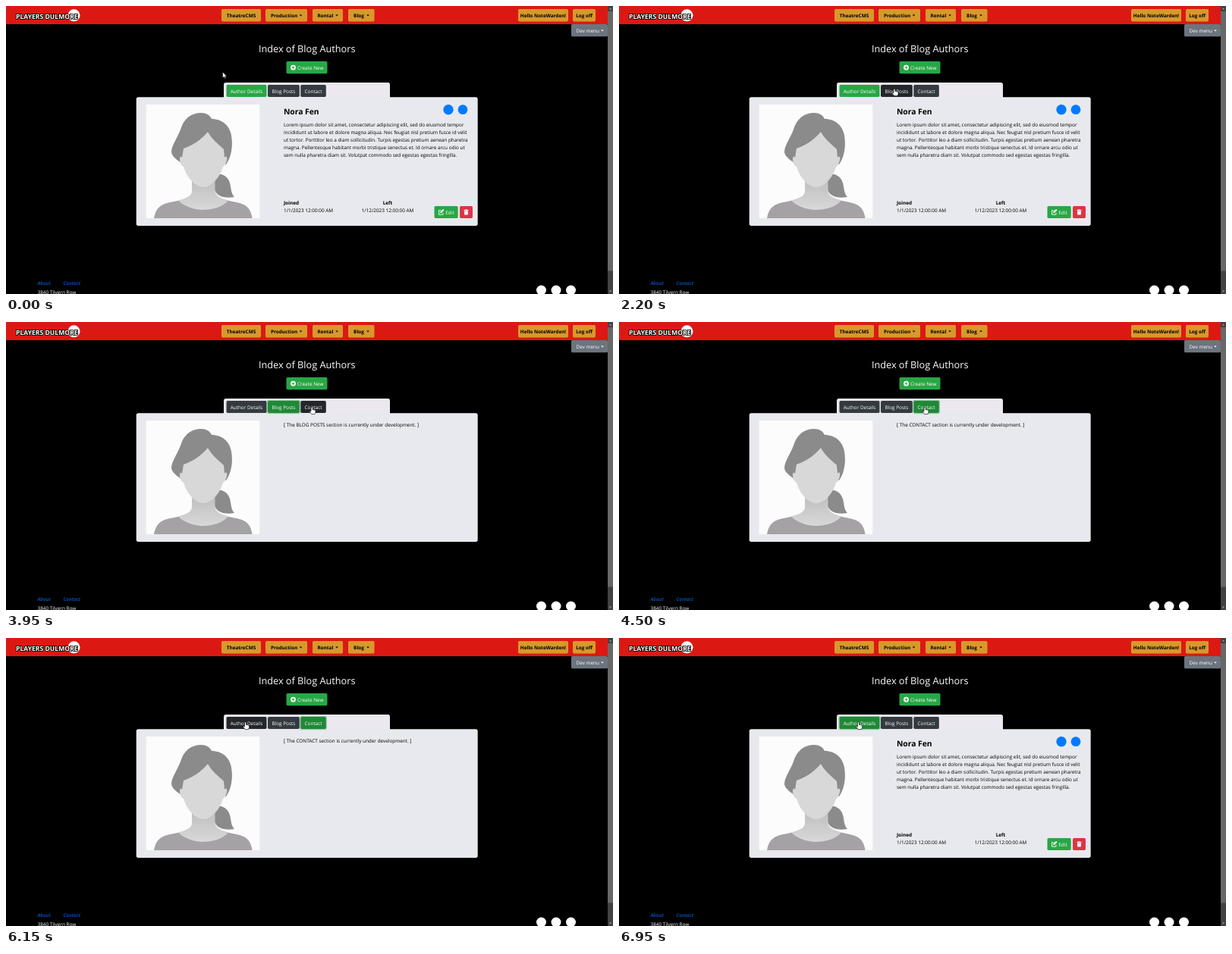
An HTML page that plays this animation: 800x380 px, repeating every 7 s.

```html
<!DOCTYPE html>
<html lang="en">
<head>
<meta charset="utf-8">
<title>Blog authors</title>
<style>
  html, body { margin: 0; width: 100%; height: 100%; overflow: hidden; background: #000; }
  svg { display: block; width: 800px; height: 380px; }
  text { font: 6.4px "Open Sans", "Noto Sans", sans-serif; text-rendering: geometricPrecision; white-space: pre; }
  .b { font-weight: 700; }
  .mid { text-anchor: middle; }
  .link { font-weight: 600; font-style: italic; fill: #0a58d0; }
</style>
</head>
<body>
<svg id="stage" viewBox="0 0 800 380">
  <defs>
    <linearGradient id="neck" x1="0" y1="0" x2="0" y2="1">
      <stop offset="0" stop-color="#bdbcbd"/>
      <stop offset="1" stop-color="#d9d8d9"/>
    </linearGradient>
    <clipPath id="photo"><rect x="184.5" y="130" width="150" height="150"/></clipPath>
  </defs>
  <g id="page"></g>

  <g clip-path="url(#photo)">
    <rect x="184.5" y="130" width="150" height="150" fill="#fdfcfd"/>
    <path fill="#8c8b8c" d="M233 209C229 205 219 200 218 193C218 184 226 174 230 163C234 149 244 141 257 141C264 141 269 144 271 149C285 149 295 158 297 171C299 182 298 198 290 209Z"/>
    <path fill="#8c8b8c" d="M277 222C289 220 295 229 296 238C297 245 298 249 301 252C290 254 280 252 276 245C272 237 272 228 277 222Z"/>
    <path fill="#a4a2a4" d="M195 280C197 269 202 262 214 259.500C227 257 240 255 245 249H275C280 255 294 257 306 259.500C318 262 323 269 324.500 280Z"/>
    <path fill="url(#neck)" d="M245 224H275.500V244C276 251 284 254 293 256.500C286 265 272 269 260 269C247 269 234 264 227 256.500C237 254 245 251 245 244Z"/>
    <path fill="#d9d8d9" d="M266 166C270 174 279 182 287 189L288 200C290 197 292 199 291 203C290 208 288 211 286 212C282 226 271 239 260 239C249 239 238 226 234 212C231 211 229 206 229 202C229 198 231 198 232 200L234 188C246 184 258 176 266 166Z"/>
  </g>

  <g id="details"></g>
  <text id="notice" x="366" y="137.600"></text>
  <g id="tabs"></g>
  <g id="cursor" stroke="#000" stroke-width=".6" stroke-linejoin="round" fill="#fff">
    <path id="arrow" d="M0 0V8L1.900 6.300L3.200 9L4.400 8.400L3.200 5.900H5.600Z"/>
    <path id="hand" d="M-1 .9Q0 -.7 1 .9V3.600Q1.900 3 2.500 3.900Q3.400 3.400 3.900 4.300Q5 4.100 5 5.200V7.200L4 9.600H-.4L-2.800 6.500Q-3.200 5 -1.900 5.300L-1 6.200Z"/>
  </g>
</svg>
<script>
const $ = id => document.getElementById(id);
const page = $("page"), details = $("details");

function add(parent, tag, attrs, content) {
  const el = document.createElementNS("http://www.w3.org/2000/svg", tag);
  for (const key in attrs) el.setAttribute(key, attrs[key]);
  if (content) el.textContent = content;
  parent.appendChild(el);
  return el;
}
const box = (p, x, y, width, height, fill, rx = 0) => add(p, "rect", { x, y, width, height, fill, rx });
const label = (p, x, y, str, fill = "#000", cls = "", more = {}) =>
  add(p, "text", { x, y, fill, class: cls, ...more }, str);
const dot = (p, cx, cy, r, fill) => add(p, "circle", { cx, cy, r, fill });
const shape = (p, d, fill) => add(p, "path", { d, fill });
const caret = (x, y, fill) => shape(page, `M${x - 1.8} ${y}h3.600l-1.800 1.900z`, fill);

// Navigation bar
box(page, 0, 0, 793, 24, "#dc1813");
dot(page, 89.5, 12.3, 8, "#fff");
label(page, 13, 16.8, "PLAYERS DULMORE", "#fff", "b",
  { style: "font-size:8.600px", stroke: "#000", "stroke-width": 1.6, "paint-order": "stroke" });
[
  [284, 52, "TheatreCMS", 310], [342, 55, "Production", 366.5, 388.5],
  [404, 40, "Rental", 421, 436], [451, 34.5, "Blog", 465, 477],
  [675, 66, "Hello NoteWarden!", 708], [747, 30, "Log off", 762]
].forEach(([x, w, str, mid, tip]) => {
  box(page, x, 4, w, 16.5, "#d9982b", 1.7);
  label(page, mid, 14.8, str, "#000", "b mid");
  if (tip) caret(tip, 11.6, "#000");
});
box(page, 745, 24, 48, 16.3, "#6c757d", 1.5);
label(page, 766.7, 34.8, "Dev menu", "#fff", "mid");
caret(786, 31.5, "#fff");

// Scrollbar
box(page, 793, 0, 7, 380, "#424242");
box(page, 793, 7, 7, 342.5, "#686868");
shape(page, "M794.800 4.500l1.700 -2l1.700 2z", "#a0a0a0");
shape(page, "M794.800 375.500l1.700 2l1.700 -2z", "#a0a0a0");

// Heading and card
label(page, 396.7, 61, "Index of Blog Authors", "#fff", "mid", { style: "font-size:12.700px" });
box(page, 369.5, 73, 54, 16.3, "#28a745", 1.7);
dot(page, 378.5, 81.2, 3.4, "#fff");
shape(page, "M378 79.200h1v1.500h1.500v1h-1.500v1.500h-1v-1.500h-1.500v-1h1.500z", "#28a745");
label(page, 384, 83.6, "Create New", "#fff");
box(page, 287, 101, 219, 24, "#ebe8f0", 2.7);
box(page, 171.7, 120.3, 450, 169.7, "#e8e9ee", 2.7);

// Footer
label(page, 41.5, 367.6, "About", "", "link");
label(page, 75.5, 367.6, "Contact", "", "link");
label(page, 41.5, 380, "3840 Tilvern Row", "#fff");
[705.5, 725, 744.5].forEach(x => dot(page, x, 375, 6.5, "#fff"));

// Author details
label(details, 366, 142.7, "Nora Fen", "#000", "b", { style: "font-size:10.300px" });
dot(details, 583, 136.7, 6.7, "#007bff");
dot(details, 602, 136.7, 6.4, "#007bff");
[
  "Lorem ipsum dolor sit amet, consectetur adipiscing elit, sed do eiusmod tempor",
  "incididunt ut labore et dolore magna aliqua. Nec feugiat nisl pretium fusce id velit",
  "ut tortor. Porttitor leo a diam sollicitudin. Turpis egestas pretium aenean pharetra",
  "magna. Pellentesque habitant morbi tristique senectus et. Id ornare arcu odio ut",
  "sem nulla pharetra diam sit. Volutpat commodo sed egestas egestas fringilla."
].forEach((line, i) => label(details, 366, 158.6 + i * 10, line));
label(details, 366, 261.8, "Joined", "#000", "b");
label(details, 503, 261.8, "Left", "#000", "b mid");
label(details, 366, 271.8, "1/1/2023 12:00:00 AM");
label(details, 503, 271.8, "1/12/2023 12:00:00 AM", "#000", "mid");
box(details, 564.5, 264, 31.2, 16, "#28a745", 1.7);
add(details, "path", { d: "M576 272.800v2.400h-5.500v-5.500h3", fill: "none", stroke: "#fff", "stroke-width": 0.9 });
shape(details, "M572.200 273.200l.3 -1.700l3.600 -3.600l1.400 1.400l-3.600 3.600z", "#fff");
label(details, 579.3, 274.6, "Edit", "#fff");
box(details, 598, 264, 17, 16, "#dc3545", 1.7);
shape(details, "M603.500 269h1.700l.5 -.8h1.600l.5 .8h1.700v.9h-6zM603.900 270.400h5.200l-.4 5.100h-4.400z", "#fff");

// Tabs
const tabs = [[290.5, 53, "Author Details"], [345, 41.8, "Blog Posts"], [388.3, 33.5, "Contact"]]
  .map(([x, w, str]) => {
    const ring = add($("tabs"), "rect", {
      x: x - 0.6, y: 103.5, width: w + 1.2, height: 17, rx: 2.2,
      fill: "none", stroke: "#48b461", "stroke-width": 1.3
    });
    const face = box($("tabs"), x, 104, w, 16, "#343a40", 1.7);
    label($("tabs"), x + w / 2, 114.5, str, "#fff", "mid");
    return { x, w, ring, face };
  });

const LOOP = 7000, FADE = 150, SAMPLES = 6;
const clicks = [[2650, 1], [4000, 2], [6200, 0]];
const moves = [ // start, end, x, y
  [1300, 2150, 363, 109], [2850, 3270, 403, 112], [4700, 5700, 315.5, 111]
];
const notices = ["", "[ The BLOG POSTS section is currently under development. ]",
  "[ The CONTACT section is currently under development. ]"];
const green = [40, 167, 69], deepGreen = [33, 136, 56];
const slate = [52, 58, 64], deepSlate = [35, 39, 43];

function pointer(t) {
  let x = 285.5, y = 87;
  for (const [from, to, nx, ny] of moves) {
    const u = Math.min(1, Math.max(0, (t - from) / (to - from)));
    const s = u * u * (3 - 2 * u);
    x += (nx - x) * s;
    y += (ny - y) * s;
  }
  return { x, y };
}
const over = (tab, p) => p.x >= tab.x && p.x <= tab.x + tab.w && p.y >= 104 && p.y <= 120;
const section = t => clicks.reduce((now, [at, id]) => t >= at ? id : now, 0);

function look(i, t) {
  const active = section(t) === i, focus = active && t >= clicks[0][0];
  const hover = over(tabs[i], pointer(t));
  const rgb = active ? (focus || hover ? deepGreen : green) : (hover ? deepSlate : slate);
  return [...rgb, focus ? 0.5 : 0];
}

// Averaging the recent past gives the buttons their short colour fade.
function faded(i, t) {
  const sum = [0, 0, 0, 0];
  for (let k = 0; k < SAMPLES; k++)
    look(i, Math.max(0, t - k * FADE / SAMPLES)).forEach((v, c) => sum[c] += v / SAMPLES);
  return sum;
}

function draw(t) {
  const now = section(t), p = pointer(t);
  details.style.display = now ? "none" : "";
  $("notice").textContent = notices[now];
  tabs.forEach((tab, i) => {
    const [r, g, b, glow] = faded(i, t);
    tab.face.setAttribute("fill", `rgb(${r},${g},${b})`);
    tab.ring.setAttribute("stroke-opacity", glow);
  });
  const pressing = tabs.some(tab => over(tab, p));
  $("hand").style.display = pressing ? "" : "none";
  $("arrow").style.display = pressing ? "none" : "";
  $("cursor").setAttribute("transform", `translate(${p.x} ${p.y})`);
}

const start = performance.now();
function tick() {
  draw((performance.now() - start) % LOOP);
  requestAnimationFrame(tick);
}
tick();
</script>
</body>
</html>
```
